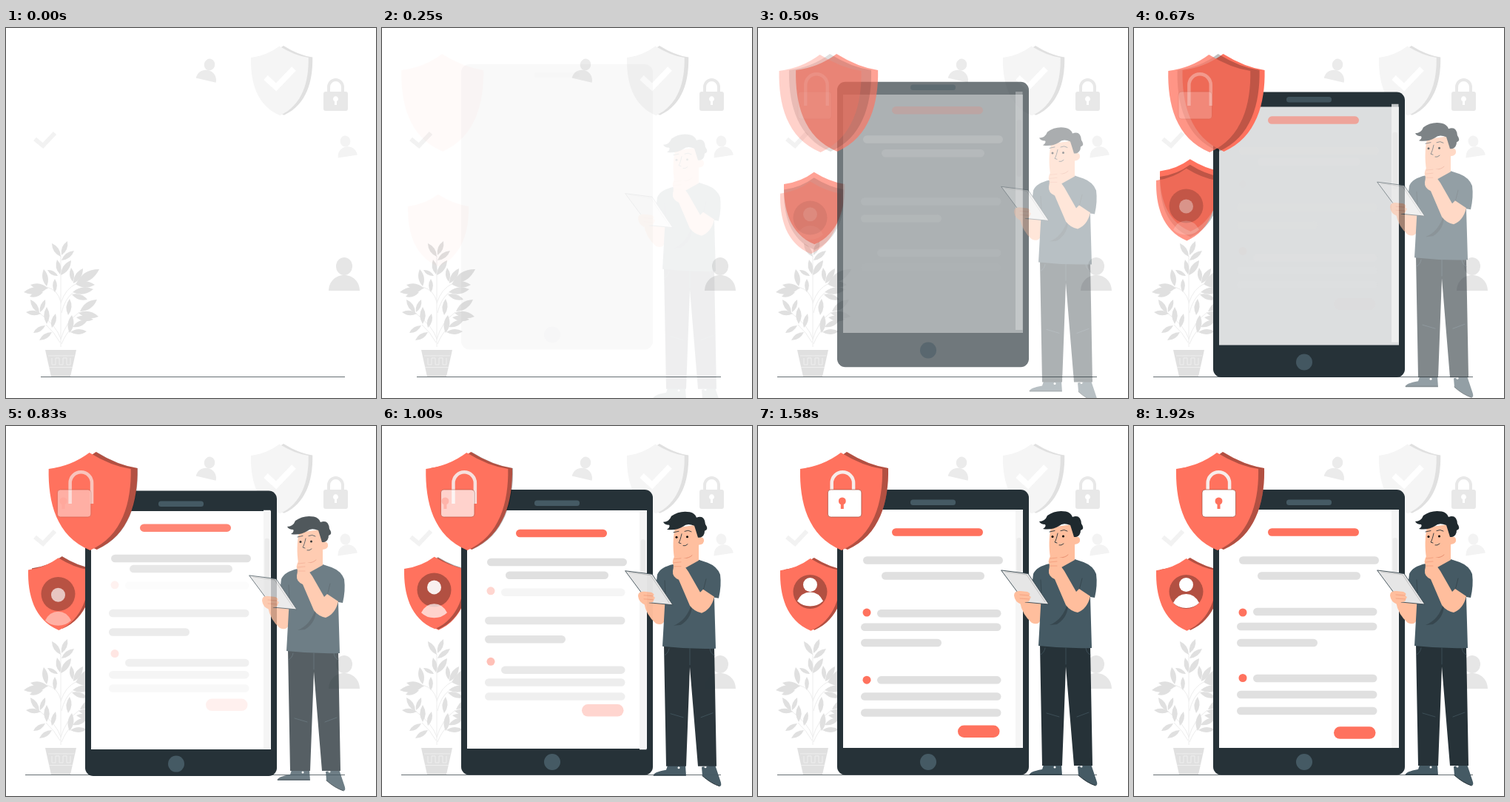
Recreate the animation shown at these times as an HTML page. Size 500 by 500 pixels, loop 1960 ms.

```html
<!DOCTYPE html>
<html lang="en">
<head>
<meta charset="utf-8">
<style>
html, body { margin: 0; width: 100%; height: 100%; overflow: hidden; background: #fff; }
svg { display: block; width: 100vw; height: 100vh; }
</style>
</head>
<body>
<svg viewBox="0 0 500 500">
<defs>
  <path id="shield" d="M0 22Q31 18 55 0Q84 18 111 22C112 66 100 113 56 132C10 113-1 66 0 22Z"/>
  <g id="user"><ellipse rx="11" ry="12"/><path d="M-21 33C-20 5 20 5 21 33Z"/></g>
</defs>

<!-- backdrop -->
<use href="#shield" transform="translate(336.5 24)scale(.7 .71)" fill="#e0e0e0"/>
<use href="#shield" transform="translate(331 24.500)scale(.7 .71)" fill="#f5f5f5"/>
<g fill="none">
  <path d="M351 67L365 80L389 55" stroke="#fff" stroke-width="8"/>
  <path d="M39 150L50 159L66 142" stroke="#f2f2f2" stroke-width="6"/>
  <path d="M436 88V80a9.500 10 0 0 1 19 0V88" stroke="#e8e8e8" stroke-width="4"/>
</g>
<rect x="429" y="86" width="33" height="26" rx="3" fill="#e8e8e8"/>
<path d="M444 99a3.500 3.500 0 1 1 3 0v5h-3z" fill="#fff"/>
<g fill="#ebebeb">
  <use href="#user" transform="translate(275 49.500)rotate(13)scale(.66)"/>
  <use href="#user" transform="translate(458.500 153)rotate(-9)scale(.63)" fill="#f3f3f3"/>
  <use href="#user" transform="translate(457 322)" fill="#e6e6e6"/>
</g>
<g id="plant" fill="#e0e0e0">
  <path d="M74 431V308M74 420Q68 402 45 385M73 425Q66 412 54 401M74 421Q80 398 99 384M75 427Q80 414 90 404M74 372Q80 352 96 345M74 370Q70 354 55 350M75 385Q79 367 90 358" fill="none" stroke="#ededed"/>
  <path d="M53 435H95L87 471H61Z"/>
  <path d="M57 443H92M58 458.500H90M62 446v9h5v-9h5v9h5v-9h5v9h5v-9" fill="none" stroke="#eee"/>
</g>
<path id="floor" stroke="#263238" stroke-opacity=".7"/>

<!-- small badge -->
<g data-a="4.500 16.500 0 48"><use href="#shield" transform="translate(35 178)scale(.74)" fill="#ff725e"/></g>
<g data-a="5.200 19.500 0 42"><use href="#shield" transform="translate(35 178)scale(.74)" opacity=".3"/></g>
<g data-a="6 20 0 42"><use href="#shield" transform="translate(30 179)scale(.74)" fill="#ff725e"/></g>
<g data-a="6.500 22 0 42"><circle cx="70.500" cy="224" r="23" opacity=".3"/></g>
<g data-a="7 28 0 42"><circle cx="70.500" cy="214.500" r="9.500" fill="#fff"/></g>
<g data-a="8 34 0 42"><path d="M53 239Q59 227 70.500 227T88 239Q81 246 70.500 246T53 239Z" fill="#fff"/></g>

<!-- tablet -->
<g data-a="4.500 16.500 0 -38"><rect x="107" y="86" width="259" height="385.500" rx="11" fill="#263238"/></g>
<g data-a="4.800 18 0 -40"><circle cx="230" cy="454" r="11" fill="#455a64"/></g>
<g data-a="5.200 19.500 0 -40">
  <rect x="206" y="99.500" width="61" height="7.500" rx="3.500" fill="#455a64"/>
  <path d="M115 113H358V435H115Z" fill="#fff"/>
</g>
<g data-a="6 20 0 -40">
  <path d="M348 113h9.500V435h-9.500Z" fill="#f5f5f5"/>
  <rect x="349.500" y="151" width="6.500" height="77" rx="3" fill="#ebebeb"/>
</g>
<g id="page"></g>

<!-- big badge -->
<g data-a="4.500 16.500 -40 0"><use href="#shield" x="65" y="35" fill="#ff725e"/></g>
<g data-a="5.200 19.500 -40 0"><use href="#shield" x="65" y="35" opacity=".3"/></g>
<g data-a="6 20 -42 0"><use href="#shield" x="57" y="36" fill="#ff725e"/></g>
<g data-a="7 28 -40 0"><path d="M99.700 105V77a14.700 14.700 0 0 1 29.400 0V105" fill="none" stroke="#f7ecea" stroke-width="4.500"/></g>
<g data-a="8 34 -40 0"><rect x="92" y="86" width="45.500" height="37" rx="4" fill="#fff" stroke="#a34838" stroke-width=".7"/></g>
<g data-a="14 34 -40 0"><path d="M111 106a5 5 0 1 1 4 0v6h-4z" fill="#ff725e"/></g>

<!-- man -->
<g data-a="4.500 20 0 31 linear" stroke-linecap="round">
  <path d="M386 458H410L411 472H367Q366 467 384 464ZM432 460L450 457L457 478Q460 486 456 486Q444 482 433 472Z" fill="#455a64"/>
  <path d="M367 471H410M433 472Q444 482 456 486" fill="none" stroke="#263238"/>
  <circle cx="401" cy="461" r="1.500" fill="#fff"/><circle cx="437" cy="460" r="1.500" fill="#fff"/>
  <path d="M381 296L384 459H411L416 325L427 459H452L449 298Z" fill="#263238"/>
  <path d="M416 300V322M388 300Q387 306 382 309M443 300Q444 307 449 309M390 388L407 393M431 393L447 387" fill="none" stroke="#455a64" stroke-width=".7"/>
  <path d="M355 232L372 222L383 232L382 262Q379 270 370 266Q357 255 354 238Z" fill="#ffbe9d"/>
  <path d="M394 186Q376 190 372 200L370 217L383 226L379 297Q415 301 451 300L449 231L455 232Q459 215 457 200Q453 189 440 184L428 180Q412 190 394 186Z" fill="#455a64"/>
  <path d="M394 269Q412 262 419 238Q420 258 404 268Z" fill="#37474f"/>
  <path d="M383 226L382 208M434 222L438 206" fill="none" stroke="#37474f"/>
  <path d="M396 137C393 150 393 165 395 178Q398 190 410 191L428 181V160Q436 159 435 153Q434 148 428 150L424 133Z" fill="#ffbe9d"/>
  <path d="M380 129Q388 129 391 121Q402 113 416 115.500Q423 117 425 123Q436 119 437 132Q442 139 436 141Q436 148 430 150L427 150Q424 140 422 134Q412 130 407 135Q397 141 385 139Q390 136 388 133Q382 133 380 129Z" fill="#1f292e"/>
  <g fill="none" stroke="#263238" stroke-width=".9">
    <path d="M394 143L401 141.500M409 141.500Q414 139 418 142M405 145Q403 154 401 157L404 158M407 161Q410 162 413 159"/>
    <path d="M408 178Q415 178 419 174" stroke="#e58b6c"/>
  </g>
  <circle cx="398" cy="149.500" r="1.500"/><circle cx="412.500" cy="149" r="1.500"/>
  <path d="M395 176Q401 171 405 177L411 178Q415 184 409 189L414 196L430 224L434 220L449 230Q445 247 432 252Q422 250 416 242L401 207Q392 203 393 195Q394 190 394 188Q391 183 395 176Z" fill="#ffbe9d"/>
  <path d="M395 179L404 178M394 184L404 183M394 189L404 189" fill="none" stroke="#f29c7c" stroke-width=".8"/>
  <path d="M329 195L365 199.500L393 241L361 238Z" fill="#e6e6e6" stroke="#37474f" stroke-width=".9"/>
  <path d="M334 197L363 201L388 238" fill="none" stroke="#b0b0b0" stroke-width=".7"/>
  <path d="M346 229Q346 222 355 223L364 224Q370 227 366 229Q371 231 367 234Q368 238 361 238L356 241Q347 238 346 229Z" fill="#ffbe9d"/>
  <path d="M354 228L366 229M354 233L367 234" fill="none" stroke="#f29c7c" stroke-width=".8"/>
</g>
</svg>
<script>
const $ = id => document.getElementById(id);
const add = (parent, html) => parent.insertAdjacentHTML("beforeend", html);

// leaves: base x, y, tip x, y
const leaves = [
  [74,309,62,291], [75,307,83,288], [75,314,92,301], [73,333,69,313], [74,334,88,314],
  [70,335,56,327], [55,349,51,326], [66,357,66,339], [57,352,33,347], [54,353,24,357],
  [50,357,32,363], [90,343,88,324], [91,345,104,325], [95,345,126,326], [94,346,120,347],
  [90,357,118,353], [89,360,110,367], [45,385,33,367], [46,384,53,367], [47,386,27,384],
  [55,400,55,377], [53,402,37,412], [62,405,67,386], [62,411,45,422], [84,388,86,366],
  [100,383,123,367], [98,385,125,390], [95,391,118,394], [86,412,89,388], [90,404,110,395],
  [87,411,109,410]
];
for (const [x, y, u, v] of leaves) {
  const mx = (x + u) / 2, my = (y + v) / 2, nx = (v - y) * .32, ny = (x - u) * .32;
  add($("plant"), `<path d="M${x} ${y}Q${mx + nx} ${my + ny} ${u} ${v}Q${mx - nx} ${my - ny} ${x} ${y}"/>`);
}

// page bars: x, width, centre y, height, start, length, colour
const grey = "#e0e0e0", coral = "#ff725e";
const bars = [
  [181, 123, 143.5, 10.5, 6.5, 24, coral],
  [142, 189, 181.5, 10.5, 6.6, 21.6, grey],
  [167, 139, 202.5, 10.5, 6.2, 27, grey],
  [141.5, 11, 251, 11, 14.7, 32.5, coral],
  [161, 167.5, 251, 10.5, 14.7, 30, grey],
  [139, 189.5, 271, 10.5, 7, 32, grey],
  [139, 109, 293, 10.5, 6.8, 29.6, grey],
  [141.5, 11, 340.5, 11, 13.6, 29, coral],
  [161, 167.5, 341, 10.5, 7, 35, grey],
  [139, 189.5, 363, 10.5, 10, 33, grey],
  [139, 189.5, 385, 10.5, 12.3, 30, grey],
  [270, 56.5, 412.6, 16.5, 14, 35, coral]
];
for (const [x, w, y, h, start, len, fill] of bars)
  add($("page"), `<g data-a="${start} ${len} 0 -40"><rect x="${x}" y="${y - h / 2}" width="${w}" height="${h}" rx="${h / 2}" fill="${fill}"/></g>`);

// cubic-bezier(.36, -.01, .5, 1.38): overshoots, then settles
const curve = (s, a, b) => 3 * (1 - s) ** 2 * s * a + 3 * (1 - s) * s * s * b + s ** 3;
function ease(x) {
  let lo = 0, hi = 1;
  for (let i = 0; i < 20; i++) {
    const mid = (lo + hi) / 2;
    if (curve(mid, .36, .5) < x) lo = mid; else hi = mid;
  }
  return curve(lo, -.01, 1.38);
}

const movers = [...document.querySelectorAll("[data-a]")].map(el => {
  const [start, len, dx, dy, linear] = el.dataset.a.split(" ");
  return { el, start: +start, len: +len, dx: +dx, dy: +dy, linear };
});

function draw(now) {
  const tick = Math.floor((now % 1960 + 4) * .024); // 24 steps a second
  for (const { el, start, len, dx, dy, linear } of movers) {
    const x = Math.min(1, Math.max(0, (tick - start) / len));
    const p = x === 0 || x === 1 || linear ? x : ease(x);
    el.setAttribute("transform", `translate(${dx * (1 - p)} ${dy * (1 - p)})`);
    el.setAttribute("opacity", Math.min(1, Math.max(0, p)));
  }
  $("floor").setAttribute("d", `M${tick < 12 ? 47 : 26} 471.5H458`);
  requestAnimationFrame(draw);
}
draw(0);
</script>
</body>
</html>
```
